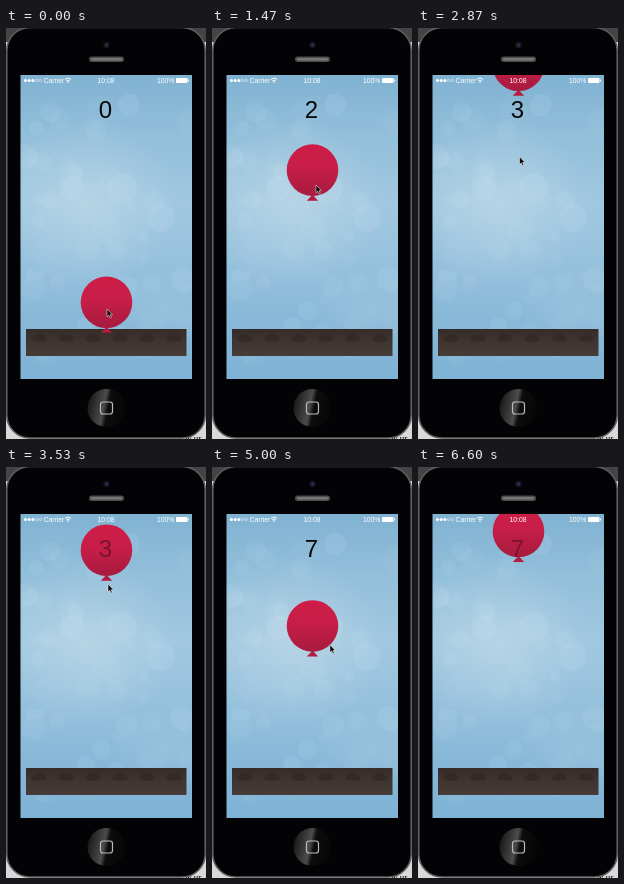
These frames come from a looping animation (200 px wide and 411 px high, 6.63 s). An HTML page:

```html
<!DOCTYPE html>
<html lang="en">
<head>
<meta charset="utf-8">
<title>Balloon tap</title>
<style>
html, body { margin: 0; width: 100%; height: 100%; overflow: hidden; background: #ddd; }
svg { display: block; width: 200px; height: 411px; }
text { font-family: "Liberation Sans", Arial, sans-serif; }
.status { font-size: 6.8px; fill: #fff; }
.score { font-size: 24px; text-anchor: middle; }
</style>
</head>
<body>
<svg viewBox="0 0 200 411">
  <defs>
    <linearGradient id="sky" x1="0" y1="0" x2="0" y2="1">
      <stop offset="0" stop-color="#80b2d2"/>
      <stop offset=".2" stop-color="#92bfda"/>
      <stop offset=".42" stop-color="#a1c8e0"/>
      <stop offset=".65" stop-color="#94c0dc"/>
      <stop offset=".85" stop-color="#84b6d7"/>
      <stop offset="1" stop-color="#7fb3d5"/>
    </linearGradient>
    <radialGradient id="haze">
      <stop offset="0" stop-color="#d2e2ec" stop-opacity=".45"/>
      <stop offset="1" stop-color="#d2e2ec" stop-opacity="0"/>
    </radialGradient>
    <linearGradient id="skin" x1="0" y1="0" x2="0" y2="1">
      <stop offset="0" stop-color="#ce1d47"/>
      <stop offset=".45" stop-color="#c71e47"/>
      <stop offset="1" stop-color="#a71b3f"/>
    </linearGradient>
    <linearGradient id="soil" x1="0" y1="0" x2="0" y2="1">
      <stop offset="0" stop-color="#352c29"/>
      <stop offset=".5" stop-color="#3f3531"/>
      <stop offset="1" stop-color="#463b37"/>
    </linearGradient>
    <linearGradient id="dish" x1="0" y1=".4" x2="1" y2=".6">
      <stop offset="0" stop-color="#181818"/>
      <stop offset=".42" stop-color="#4c4c4c"/>
      <stop offset=".54" stop-color="#0c0c0c"/>
      <stop offset="1" stop-color="#060606"/>
    </linearGradient>
    <clipPath id="screen"><rect x="14.500" y="47" width="171.500" height="304"/></clipPath>
    <clipPath id="covered"><circle id="cover" cx="100.500" r="25.800"/></clipPath>
  </defs>

  <!-- page behind the phone -->
  <rect width="200" height="411" fill="#d9d9d9"/>
  <rect width="200" height="14" fill="#444"/>
  <text x="179" y="413" font-size="9" style="font-family:'Liberation Serif',serif">w ur</text>

  <!-- phone -->
  <rect x=".8" y="-.5" width="198.400" height="410.500" rx="23" fill="#030306" stroke="#5e5e5e" stroke-width="1.600"/>
  <circle cx="100.500" cy="17" r="3.200" fill="#15151f"/>
  <circle cx="100.500" cy="17" r="1.500" fill="#303058"/>
  <rect x="83" y="28.500" width="35" height="5.500" rx="2.700" fill="#4d4d4d"/>
  <rect x="85" y="30" width="31" height="2.500" rx="1.200" fill="#777"/>
  <circle cx="100.500" cy="380" r="19" fill="url(#dish)"/>
  <rect x="94.500" y="374" width="12" height="12" rx="2.500" fill="none" stroke="#bbb" stroke-width="1.200"/>

  <g clip-path="url(#screen)">
    <rect x="14" y="47" width="172" height="305" fill="url(#sky)"/>
    <ellipse cx="80" cy="175" rx="90" ry="85" fill="url(#haze)"/>
    <ellipse cx="160" cy="285" rx="60" ry="45" fill="url(#haze)" opacity=".4"/>
    <g id="bokeh" fill="#e4f1f8"></g>
    <rect x="20" y="301" width="160.500" height="27" fill="url(#soil)"/>
    <g id="lumps" fill="#2a2320" opacity=".45"></g>
    <text class="score" x="99.500" y="90.300" fill="#080808">0</text>
    <g id="balloon" fill="url(#skin)">
      <path d="M0 24.500L5.700 30.500H-5.700Z" fill="#b51b42"/>
      <circle r="25.800"/>
    </g>
    <g clip-path="url(#covered)">
      <text class="score" x="99.500" y="90.300" fill="#7c1230">0</text>
    </g>
    <g id="dots" fill="#fff"></g>
    <text class="status" x="37.500" y="55">Carrier</text>
    <g fill="none" stroke="#fff">
      <path d="M59 51.300Q62 48.700 65 51.300M60.300 52.900Q62 51.400 63.700 52.900"/>
      <path d="M62 53.500V55" stroke-width="1.200"/>
    </g>
    <text class="status" x="100" y="55" text-anchor="middle">10:08</text>
    <text class="status" x="151" y="55">100%</text>
    <rect x="170" y="50" width="11.500" height="5" rx="1" fill="#fff"/>
    <rect x="182" y="51.500" width="1" height="2" fill="#fff"/>
  </g>

  <g id="pointer">
    <path transform="scale(.82)" d="M0 0V9.500L2.200 7.500L3.700 11L5.300 10.300L3.800 7H6.700Z" fill="#080808" stroke="#fff" stroke-width=".6"/>
  </g>
</svg>

<script>
const LOOP = 6.63, REST = 274.3, GRAVITY = 161, KICK = 136.8;
const TAPS = [0.22, 0.835, 1.69, 3.911, 4.45, 4.68, 4.927];

// time, x, y
const POINTER = [
  [0, 101, 281], [0.22, 101, 281], [0.835, 102, 226], [1.47, 104, 157],
  [1.69, 103, 149], [2.13, 101, 142], [3.53, 102, 117], [3.911, 106, 156],
  [4.37, 111, 197], [4.927, 112, 190], [5.63, 168, 74], [5.9, 202, 62],
  [LOOP, 202, 62]
];

const get = id => document.getElementById(id);

function add(parent, tag, attrs) {
  const el = document.createElementNS("http://www.w3.org/2000/svg", tag);
  for (const key in attrs) el.setAttribute(key, attrs[key]);
  get(parent).append(el);
}

function decorate() {
  let seed = 17;
  const random = () => (seed = seed * 16807 % 2147483647) / 2147483647;
  for (let i = 0; i < 46; i++) {
    add("bokeh", "circle", {
      cx: 18 + random() * 168, cy: 65 + random() * 270,
      r: 5 + random() * 9, opacity: 0.02 + random() * 0.06
    });
  }
  for (const [cx, cy, r] of [[116, 160, 15], [155, 190, 14], [123, 77, 11], [66, 160, 12], [80, 298, 9]]) {
    add("bokeh", "circle", { cx, cy, r, opacity: 0.09 });
  }
  for (let i = 0; i < 6; i++) {
    const x = 33 + i * 27;
    add("lumps", "path", { d: `M${x - 8} 312Q${x - 6} 306 ${x} 306T${x + 8} 312Q${x} 316 ${x - 8} 312Z` });
  }
  for (let i = 0; i < 5; i++) {
    add("dots", "circle", i < 3
      ? { cx: 19.5 + i * 3.7, cy: 52.5, r: 1.5 }
      : { cx: 19.5 + i * 3.7, cy: 52.5, r: 1.2, fill: "none", stroke: "#fff", "stroke-width": 0.5 });
  }
}

// Gravity starts with the first tap; every tap adds the same upward speed.
function height(t) {
  const fall = Math.max(0, t - TAPS[0]);
  return TAPS.reduce((y, tap) => y - KICK * Math.max(0, t - tap), REST + GRAVITY / 2 * fall * fall);
}

function pointerAt(t) {
  const i = POINTER.findIndex(p => p[0] > t);
  const a = POINTER[i - 1], b = POINTER[i];
  const k = (t - a[0]) / (b[0] - a[0]);
  return [a[1] + (b[1] - a[1]) * k, a[2] + (b[2] - a[2]) * k];
}

const balloon = get("balloon"), cover = get("cover"), pointer = get("pointer");
const scores = document.querySelectorAll(".score");

function draw(now) {
  const t = now / 1000 % LOOP;
  const y = height(t);
  balloon.setAttribute("transform", `translate(100.5 ${y})`);
  cover.setAttribute("cy", y);
  pointer.setAttribute("transform", `translate(${pointerAt(t)})`);
  const count = TAPS.filter(tap => tap <= t).length;
  for (const label of scores) label.textContent = count;
}

decorate();
const start = performance.now();
function tick() {
  draw(performance.now() - start);
  requestAnimationFrame(tick);
}
tick();
</script>
</body>
</html>
```
